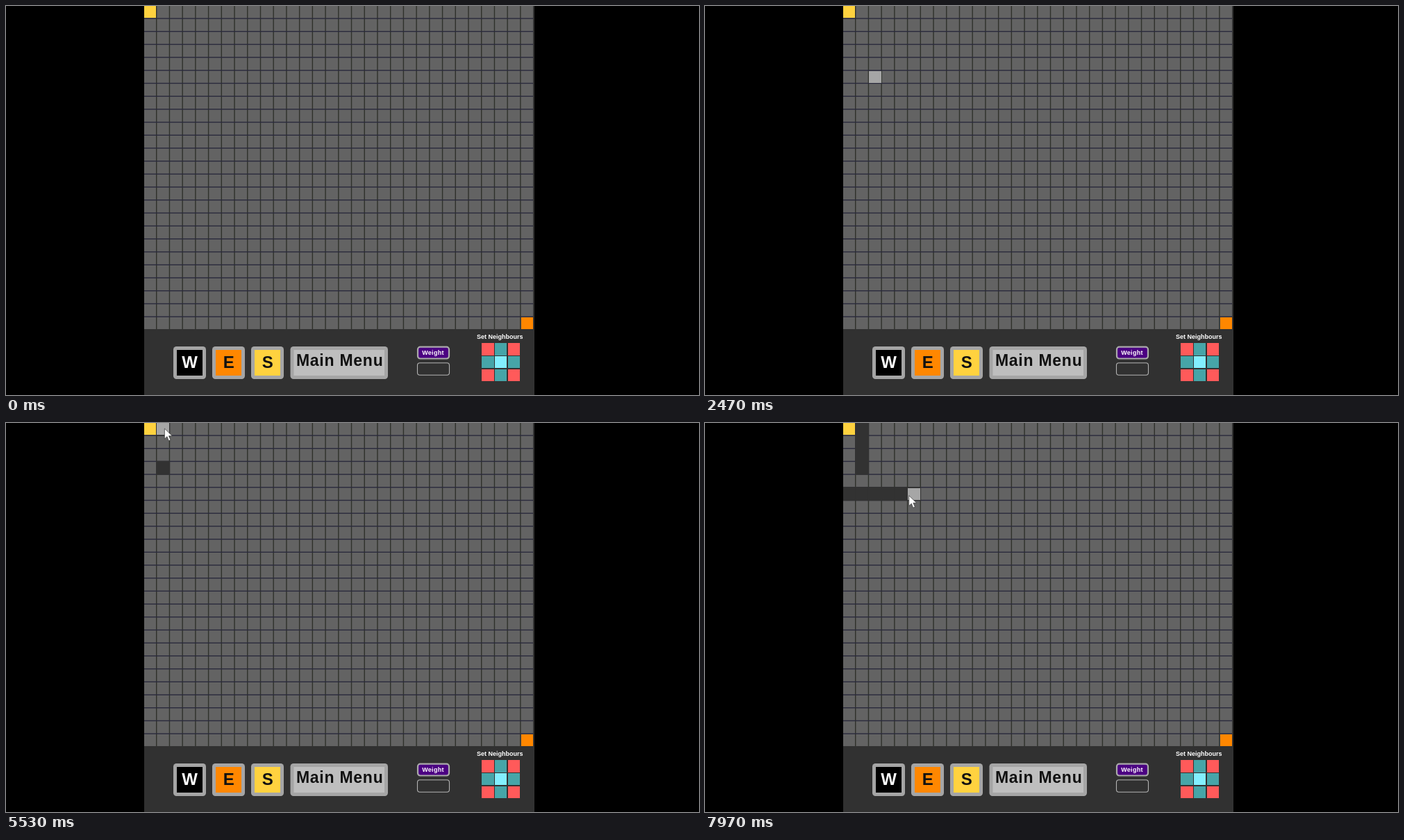
Write an HTML page that moves like this. It is 998 px wide and 561 px high and loops after 8000 ms.

```html
<!DOCTYPE html>
<html lang="en">
<head>
<meta charset="utf-8">
<title>Grid editor</title>
<style>
  html, body { margin: 0; width: 100%; height: 100%; overflow: hidden; background: #000; }
  svg { display: block; width: 100%; height: 100%; }
  text { font: bold 24px "Liberation Sans", Arial, sans-serif; text-anchor: middle; }
  .small { font-size: 9px; fill: #fff; }
</style>
</head>
<body>
<svg id="stage" viewBox="0 0 998 561"></svg>
<script>
const LOOP = 8000, LEFT = 198.7, PITCH_X = 18.72, PITCH_Y = 18.7, SIZE = 17.45;
const LINE = 1.4, COLS = 30, ROWS = 25;
const stage = document.getElementById('stage');

function add(name, attrs, text = '') {
  const el = document.createElementNS(stage.namespaceURI, name);
  for (const key in attrs) el.setAttribute(key, attrs[key]);
  el.textContent = text;
  return stage.appendChild(el);
}
const rect = (x, y, width, height, fill, more) => add('rect', { x, y, width, height, fill, ...more });
const label = (x, y, text, more) => add('text', { x, y, ...more }, text);
const colX = col => LEFT + col * PITCH_X;
const rowY = row => row * PITCH_Y;

// A square snapped to whole pixels
function square(x, y, fill) {
  const left = Math.round(x), top = Math.round(y);
  return rect(left, top, Math.round(x + SIZE) - left, Math.round(y + SIZE) - top, fill);
}
const cell = (col, row, fill) => square(colX(col), rowY(row), fill);

function button(x, width, fill) {
  rect(x, 491, width, 47, '#a5a5a5', { rx: 4.5 });
  rect(x + 5, 496, width - 10, 37, fill);
}

// Board
const boardWidth = 560, boardHeight = 466;
rect(199, 0, 562, 561, '#313131');
rect(199, 0, boardWidth, boardHeight, '#636363');
for (let i = 1; i < COLS; i++) rect(colX(i) - LINE, 0, LINE, boardHeight, '#2f312b');
for (let i = 1; i < ROWS; i++) rect(199, rowY(i) - LINE, boardWidth, LINE, '#2a2a3c');
cell(0, 0, '#ffd23f');
cell(29, 24, '#ff8700');

// Toolbar
[['W', 241, '#000', '#fff'], ['E', 297, '#ff8700', '#111'], ['S', 353, '#ffd23f', '#111']]
  .forEach(([key, x, fill, ink]) => {
    button(x, 47, fill);
    label(x + 23.7, 522, key, { fill: ink });
  });
button(409.5, 140.5, '#bebebe');
label(480.7, 519, 'Main Menu', { fill: '#111', style: 'font-size:23px;letter-spacing:.75px' });
rect(593, 491.7, 45, 16.8, '#4b0082', { rx: 3.5, stroke: '#aaa', 'stroke-width': 2.2 });
label(615, 503, 'Weight', { class: 'small', style: 'letter-spacing:.3px' });
rect(592.5, 514.7, 46, 17.6, 'none', { rx: 3.5, stroke: '#b4b4b4', 'stroke-width': 1.1 });
label(711.3, 480, 'Set Neighbours', { class: 'small' });
for (let i = 0; i < 9; i++) {
  const fill = i === 4 ? '#82f0ff' : i % 2 ? '#46a5a8' : '#ff5a5a';
  square(685.2 + i % 3 * PITCH_X, 486.1 + Math.floor(i / 3) * PITCH_Y, fill);
}

// Pointer path: time, x, y
const path = [
  [0, 264, 515], [1650, 264, 515], [2350, 246, 103], [2600, 246, 103],
  [3000, 226, 12], [3400, 224, 8], [3770, 232.5, 77.5], [4100, 232, 76],
  [4300, 231, 66], [4400, 231, 64], [4770, 231.3, 25], [5150, 229, 8],
  [5800, 228, 8], [6230, 229.3, 58], [6500, 226, 80], [6700, 212, 82],
  [7000, 208, 101], [7500, 209, 102], [7970, 293.7, 104.6], [8000, 293.7, 104.6]
];
const strokes = [[4280, 4420], [5250, 6300], [7100, 8000]];
const POINTER_SHOWN = 2530;

function pointerAt(time) {
  const next = Math.max(1, path.findIndex(point => point[0] > time));
  const [t0, x0, y0] = path[next - 1], [t1, x1, y1] = path[next];
  const u = (time - t0) / (t1 - t0), k = u * u * (3 - 2 * u);
  return { x: x0 + (x1 - x0) * k, y: y0 + (y1 - y0) * k };
}
const cellAt = ({ x, y }) => [Math.floor((x - LEFT) / PITCH_X), Math.floor(y / PITCH_Y)];

// Each cell the pointer visits during a stroke becomes a wall at that moment.
const walls = new Map();
for (const [from, to] of strokes) {
  for (let time = from; time < to; time += 5) {
    const [col, row] = cellAt(pointerAt(time));
    const id = col + ',' + row;
    if (walls.has(id)) continue;
    const x = Math.max(199, colX(col) - LINE), y = rowY(row) - LINE;
    walls.set(id, { time, el: rect(x, y, colX(col + 1) - x, PITCH_Y + LINE, '#323232') });
  }
}

const hover = square(0, 0, '#a6a6a6');
const pointer = add('path', {
  d: 'M0 0V15L3.6 11.6L6 17.6L8.7 16.5L6.2 10.7H11Z',
  fill: '#fff', stroke: '#333', 'stroke-width': 0.7
});

const show = (el, on) => el.setAttribute('visibility', on ? 'visible' : 'hidden');

function draw(now) {
  const time = now % LOOP, point = pointerAt(time), [col, row] = cellAt(point);
  walls.forEach(wall => show(wall.el, time >= wall.time));
  show(hover, row < ROWS);
  hover.setAttribute('x', Math.round(colX(col)));
  hover.setAttribute('y', Math.round(rowY(row)));
  hover.setAttribute('width', Math.round(colX(col) + SIZE) - Math.round(colX(col)));
  hover.setAttribute('height', Math.round(rowY(row) + SIZE) - Math.round(rowY(row)));
  show(pointer, time >= POINTER_SHOWN);
  pointer.setAttribute('transform', `translate(${point.x} ${point.y})`);
}

const start = performance.now();
function tick() {
  draw(performance.now() - start);
  requestAnimationFrame(tick);
}
tick();
</script>
</body>
</html>
```
